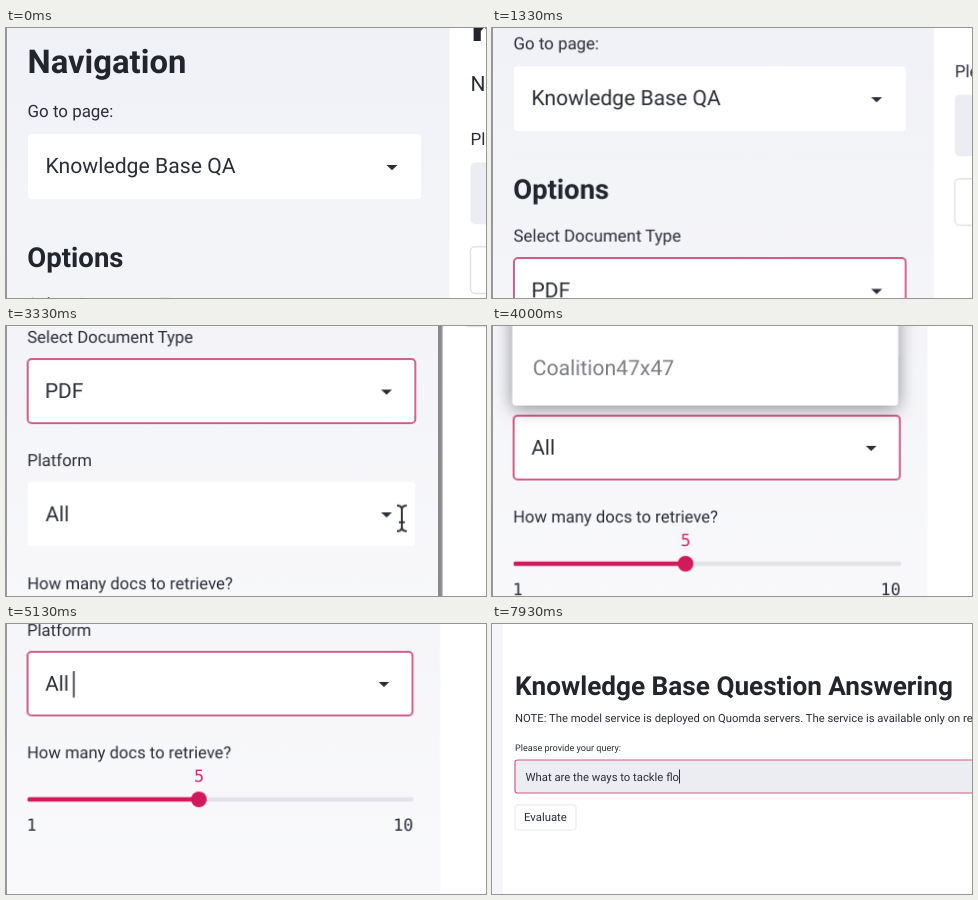
An HTML page that plays this animation: 480 by 270 pixels, repeating every 8000 ms.

```html
<!DOCTYPE html>
<html lang="en">
<head>
<meta charset="utf-8">
<title>Knowledge Base QA</title>
<style>
  html, body { margin: 0; width: 100%; height: 100%; overflow: hidden; background: #fff; }
  svg { display: block; width: 100vw; height: 100vh; }
  text { font-family: Roboto, "Open Sans", sans-serif; fill: #2b2d38; white-space: pre; text-rendering: geometricPrecision; }
  .bold { font-weight: 700; fill: #22242e; }
  .label { font-size: 16.95px; }
  .value { font-size: 21.2px; }
  .mono { font: 17px "DejaVu Sans Mono", monospace; }
  .box { fill: #fff; }
  .ring { fill: none; stroke: #d25c87; stroke-width: 2; }
  .accent { fill: #d01a5a; }

  #pan { animation: pan 8s infinite; }
  @keyframes pan {
    0% { transform: translateY(0) scale(1); animation-timing-function: cubic-bezier(.333, 0, .667, .333); }
    15.88% { transform: translateY(-61.5px) scale(.9967); animation-timing-function: linear; }
    49.59% { transform: translateY(-322.9px) scale(.9825); animation-timing-function: cubic-bezier(.333, .667, .667, 1); }
    66.3%, 100% { transform: translateY(-387.7px) scale(.979); }
  }

  /* Hard switches */
  .switch { animation: 8s step-end infinite; }
  #sidebar { animation-name: early; }
  #question { animation-name: late; }
  #docRing { animation-name: docFocus; }
  #platformRing { animation-name: platformFocus; }
  #popup { animation-name: popup; filter: drop-shadow(0 3px 9px rgba(30, 32, 45, .5)); }
  #allCaret { animation-name: allCaret; }
  #resizer, #pointer { animation-name: hover; }
  #hand { animation-name: hand; }
  #beam { animation-name: beam; }
  @keyframes early { 0% { visibility: visible; } 66.3%, 100% { visibility: hidden; } }
  @keyframes late { 0% { opacity: 0; } 66.3%, 100% { opacity: 1; } }
  @keyframes docFocus { 0% { opacity: 1; } 45%, 100% { opacity: 0; } }
  @keyframes platformFocus { 0% { opacity: 0; } 45%, 100% { opacity: 1; } }
  @keyframes popup { 0% { opacity: 0; } 46.25% { opacity: 1; } 56.25%, 100% { opacity: 0; } }
  @keyframes allCaret { 0% { opacity: 0; } 56.25%, 100% { opacity: 1; } }
  @keyframes hover { 0% { opacity: 0; } 23.75% { opacity: 1; } 46.25%, 100% { opacity: 0; } }
  @keyframes hand { 0% { opacity: 1; } 37%, 100% { opacity: 0; } }
  @keyframes beam { 0% { opacity: 0; } 37%, 100% { opacity: 1; } }

  #pointerPath { animation: pointerPath 8s ease-in-out infinite; }
  @keyframes pointerPath {
    0%, 23.75% { transform: translate(460px, 305px); }
    28.5%, 33.5% { transform: translate(385.5px, 332px); }
    40.8%, 100% { transform: translate(401.5px, 460px); }
  }
</style>
</head>
<body>
<svg viewBox="0 0 480 270" preserveAspectRatio="none">
  <defs>
    <linearGradient id="sideFill" x2="0" y2="1">
      <stop stop-color="#f0f1f6"/>
      <stop offset="1" stop-color="#fafafc"/>
    </linearGradient>
    <path id="arrow" d="M380.500 0h11l-5.500 5.200z" fill="#2b2d38"/>
    <rect id="select" x="22" width="393.2" height="65" rx="4"/>
    <g id="main">
      <text class="bold" x="23" y="71" font-size="26.15">Knowledge Base Question Answering</text>
      <text x="23" y="98" font-size="11.25">NOTE: The model service is deployed on Quomda servers. The service is available only on request</text>
      <text x="23" y="126.5" font-size="9.1">Please provide your query:</text>
      <rect x="23" y="136" width="520" height="33" rx="2.5" fill="#ecedf2"/>
      <rect x="23" y="181" width="61" height="25" rx="2.5" fill="#fff" stroke="#e0e1e6" stroke-width=".8"/>
      <text x="32" y="196.5" font-size="11.35">Evaluate</text>
    </g>
  </defs>

  <g id="sidebar" class="switch">
    <g id="pan">
      <rect y="-10" width="443.7" height="700" fill="url(#sideFill)"/>
      <rect x="443.7" y="-10" width="80" height="700" fill="#fff"/>
      <use href="#main" transform="translate(464.5 134.5) scale(1.87) translate(-23 -136)"/>
      <rect id="resizer" class="switch" x="438" y="-10" width="4.5" height="700" fill="#88888d"/>

      <text class="bold" x="21.5" y="45" font-size="32.8">Navigation</text>
      <text class="label" x="21.5" y="89">Go to page:</text>
      <use href="#select" class="box" y="106"/>
      <text class="value" x="39.5" y="145.5">Knowledge Base QA</text>
      <use href="#arrow" y="137"/>

      <text class="bold" x="21.3" y="239.5" font-size="27.5">Options</text>
      <text class="label" x="21.5" y="282">Select Document Type</text>
      <use href="#select" class="box" y="298.5"/>
      <use href="#select" id="docRing" class="ring switch" y="298.5"/>
      <text class="value" x="39.5" y="338.5">PDF</text>
      <use href="#arrow" y="329.5"/>

      <text class="label" x="21.5" y="406.7">Platform</text>
      <use href="#select" class="box" y="423.3"/>
      <use href="#select" id="platformRing" class="ring switch" y="423.3"/>
      <text class="value" x="40" y="463">All</text>
      <rect id="allCaret" class="switch" x="68.5" y="443" width="1.6" height="27" fill="#2b2d38"/>
      <use href="#arrow" y="454"/>

      <text class="label" x="21.5" y="532">How many docs to retrieve?</text>
      <text class="mono" x="197" y="556.5" text-anchor="middle" style="fill:#d6246a">5</text>
      <rect x="22" y="571.8" width="394" height="4.4" rx="1.5" fill="#e2e3e9"/>
      <rect class="accent" x="22" y="571.8" width="175" height="4.4" rx="1.5"/>
      <circle class="accent" cx="197" cy="574" r="8"/>
      <text class="mono" x="21" y="606">1</text>
      <text class="mono" x="416" y="606" text-anchor="end">10</text>

      <g id="popup" class="switch">
        <rect x="20.5" y="200" width="393" height="213" rx="4" fill="#fff"/>
        <text x="41.5" y="382" font-size="21.5" style="fill:#7c7d86">Coalition47x47</text>
      </g>

      <g id="pointer" class="switch">
        <g id="pointerPath">
          <g id="hand" class="switch" stroke="#222" stroke-width="1.6" stroke-linejoin="round">
            <path fill="#fff" d="M-3 1Q-1-2 1.500 1L4 11Q7 8 9 11Q12 9 13 12Q17 11 17 15L16 23L13 30H1L-7 20Q-10 15-5 15L-1 18Z"/>
            <path d="M4 18v7M8 18v7M12 18v7"/>
          </g>
          <path id="beam" class="switch" d="M-5-13Q0-13 0-9Q0-13 5-13M0-9V9M-5 13Q0 13 0 9Q0 13 5 13M-3 4H3" fill="none" stroke="#333" stroke-width="2"/>
        </g>
      </g>
    </g>
    <rect width="1" height="270" fill="#98989d"/>
  </g>

  <g id="question" class="switch">
    <rect width="480" height="270" fill="#fff"/>
    <rect width="11" height="270" fill="#f5f6f9"/>
    <use href="#main"/>
    <rect class="ring" x="23" y="136" width="520" height="33" rx="2.5" style="stroke-width:1.2"/>
    <text id="query" x="33.5" y="156.5" font-size="11.3"></text>
    <rect id="caret" y="145.5" width="1" height="14" fill="#2b2d38"/>
  </g>
</svg>
<script>
  const QUERY = "What are the ways to tackle flo";
  // Typing bursts: start, end (ms), characters before, characters after
  const BURSTS = [[5500, 6300, 0, 14], [6370, 7040, 14, 24], [7300, 7900, 24, 31]];
  const query = document.getElementById("query");
  const caret = document.getElementById("caret");
  const clock = document.getElementById("pan").getAnimations()[0];

  function typedCount(time) {
    let count = 0;
    for (const [start, end, from, to] of BURSTS) {
      if (time < start) break;
      const progress = Math.min(1, (time - start) / (end - start));
      count = from + 1 + Math.floor(progress * (to - from - 1));
    }
    return count;
  }

  function draw() {
    const text = QUERY.slice(0, typedCount((clock.currentTime || 0) % 8000));
    query.textContent = text;
    caret.setAttribute("x", 33.5 + (text ? query.getComputedTextLength() : 0));
    requestAnimationFrame(draw);
  }
  draw();
</script>
</body>
</html>
```
